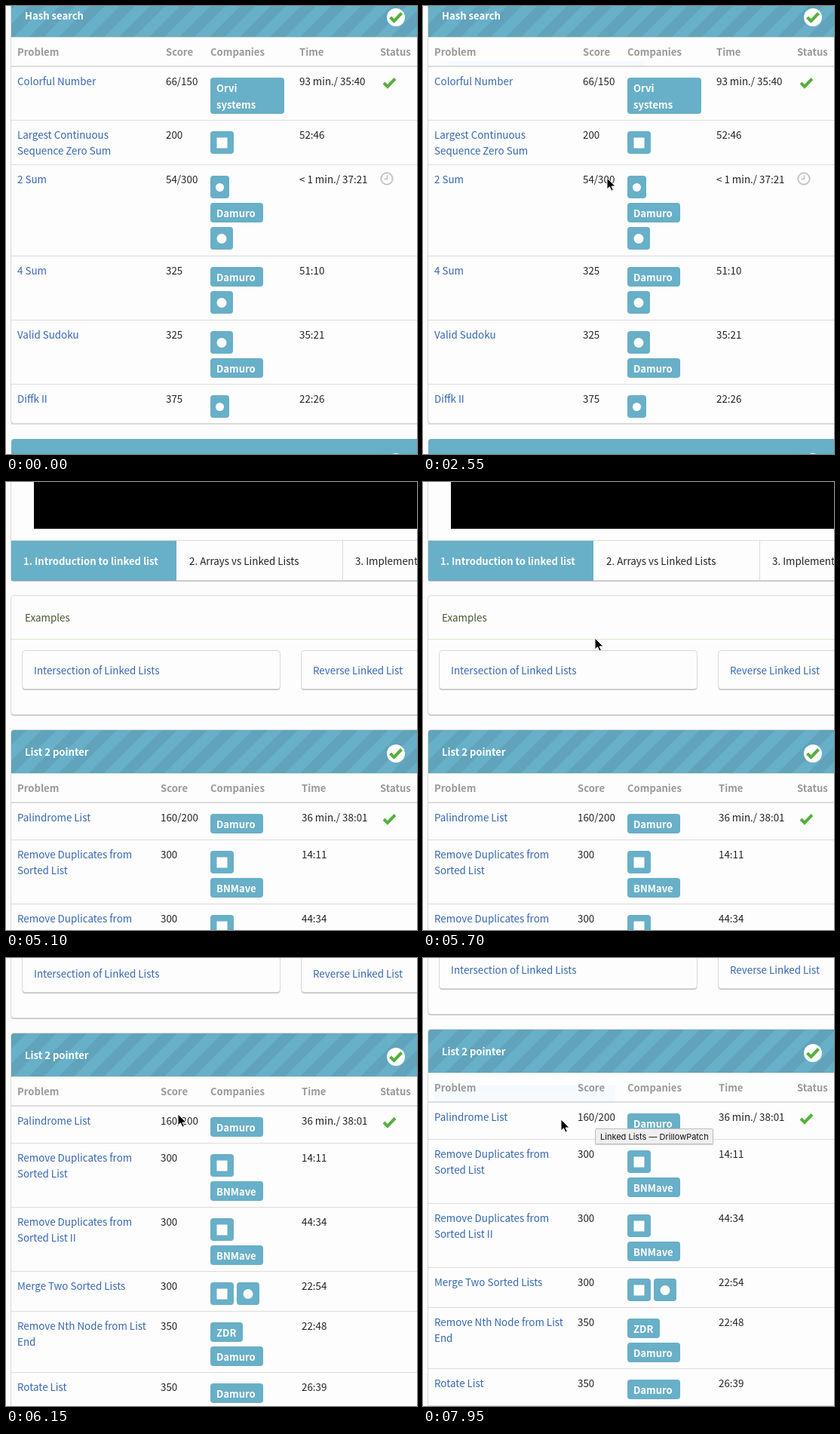
An HTML page for the animation above (8000 ms loop, 545x594 px).

```html
<!DOCTYPE html>
<html lang="en">
<head>
<meta charset="utf-8">
<title>Problem list</title>
<style>
  html, body { margin: 0; width: 100%; height: 100%; overflow: hidden; background: #fcfcfc; }
  svg { display: block; width: 545px; height: 594px; }
  text { font: 13.4px "Noto Sans CJK JP", "Noto Sans CJK SC", "Noto Sans CJK", "Open Sans", sans-serif; fill: #222; white-space: pre; }
  .bold { font-weight: 600; font-size: 13.1px; }
  .link { fill: #3567b0; }
  .head { fill: #999; }
  .white { fill: #fff; }
  .olive { fill: #46562f; }
  .tip { font: 11px Inter, "Liberation Sans", sans-serif; fill: #111; }
</style>
</head>
<body>
<svg id="stage" viewBox="0 0 545 594">
  <defs>
    <pattern id="stripes" width="40" height="40" patternUnits="userSpaceOnUse" patternTransform="translate(7 0)">
      <path d="M0 0H20L0 20ZM40 0V20L20 40H0Z" fill="#60a3bb"/>
    </pattern>
  </defs>
</svg>
<script>
const LOOP = 8000, STEP = 150;
const TEAL = '#68afc8', LINE = '#dcdcdc', TINT = '#f4faff', GREEN = '#55b03c';
const stage = document.getElementById('stage');

function add(parent, tag, attrs = {}, content) {
  const el = document.createElementNS('http://www.w3.org/2000/svg', tag);
  for (const key in attrs) el.setAttribute(key, attrs[key]);
  if (content) el.textContent = content;
  return parent.appendChild(el);
}
const group = parent => add(parent, 'g');
const box = (g, x, y, width, height, fill, rx = 0, more = {}) =>
  add(g, 'rect', { x, y, width, height, fill, rx, ...more });
const dot = (g, cx, cy, r, fill, more = {}) => add(g, 'circle', { cx, cy, r, fill, ...more });
const write = (g, x, y, content, style = '') => add(g, 'text', { x, y, class: style }, content);

function panel(g, x, y, w, h) {
  box(g, x - .5, y + 1, w + 1, h, '#c2c2c2', 4);
  box(g, x - .5, y - .5, w + 1, h, '#fdfdfd', 4, { stroke: '#d8d8d8' });
}

function check(g, x, y) {
  add(g, 'path', { d: `M${x - 7.5} ${y}l5 5 10-10.5`, fill: 'none', stroke: GREEN, 'stroke-width': 4 });
}

function titleBar(g, top, title, striped) {
  const shape = `M7 ${top + 57}V${top + 4}q0-4 4-4H545V${top + 57}Z`;
  add(g, 'path', { d: shape, fill: TEAL });
  if (striped) {
    const bar = group(g);
    bar.setAttribute('transform', `translate(0 ${top})`);
    add(bar, 'path', { d: 'M7 57V4q0-4 4-4H545V57Z', fill: 'url(#stripes)' });
  }
  write(g, 25, top + 34, title, 'bold white');
  dot(g, 517, top + 31, 12, '#fff');
  check(g, 517, top + 31);
}

// Company tags: text badges, or a badge with one plain white shape
const TAGS = {
  orvi: { w: 98, h: 48, lines: ['Orvi', 'systems'] },
  damuro: { w: 70, h: 26, lines: ['Damuro'] },
  bnmave: { w: 70, h: 26, lines: ['BNMave'] },
  zdr: { w: 43, h: 26, lines: ['ZDR'] },
  square: { w: 31, h: 30, size: 14 },
  small: { w: 25, h: 30, r: 5.5 },
  round: { w: 30, h: 30, r: 6.5 }
};

function badge(g, x, y, { w, h, lines, size, r }) {
  box(g, x, y, w, h, TEAL, 4);
  if (lines) lines.forEach((s, i) => write(g, x + 8, y + 19 + 22 * i, s, 'bold white'));
  else if (size) box(g, x + (w - size) / 2, y + (h - size) / 2 + .5, size, size, '#fff');
  else dot(g, x + w / 2, y + h / 2 + .5, r, '#fff');
}

function clock(g, x, y) {
  dot(g, x, y, 7.7, 'none', { stroke: '#c4c4c4', 'stroke-width': 1.9 });
  add(g, 'path', { d: `M${x + .5} ${y - 5}v5.5h-4`, fill: 'none', stroke: '#c4c4c4', 'stroke-width': 1.5 });
}

function table(g, top, title, scoreX, timeX, rows) {
  titleBar(g, top, title, true);
  box(g, 7, top + 57, 538, 1, '#d9e8d0');
  const heads = [[15, 'Problem'], [scoreX, 'Score'], [271, 'Companies'], [timeX, 'Time'], [496, 'Status']];
  for (const [x, s] of heads) write(g, x, top + 82, s, 'bold head');
  box(g, 7, top + 95, 538, 2, LINE);
  let y = top + 96;
  for (const [names, score, tags, time, status] of rows) {
    names.split('|').forEach((s, i) => write(g, 15, y + 25 + 21 * i, s, 'link'));
    write(g, scoreX, y + 25, score);
    write(g, timeX, y + 25, time);
    if (status) status(g, status === check ? 508.5 : 505, y + (status === check ? 22 : 19));
    let tagY = y + 15;
    for (const line of tags.split('|')) {
      let x = 271, height = 0;
      for (const name of line.split(' ')) {
        badge(g, x, tagY, TAGS[name]);
        x += TAGS[name].w + 4;
        height = TAGS[name].h;
      }
      tagY += height + 6;
    }
    y = Math.max(tagY + 2, y + 17 + 21 * names.split('|').length);
    box(g, 7, y, 538, 1, LINE);
  }
}

// First page
const hashPage = group(stage);
panel(hashPage, 7, -16, 560, 570);
const headTint = box(hashPage, 34, 73, 259, 6, TINT);
const exitTint = box(hashPage, 232, 41, 123, 37, TINT);
table(hashPage, -16, 'Hash search', 212, 389, [
  ['Colorful Number', '66/150', 'orvi', '93 min./ 35:40', check],
  ['Largest Continuous|Sequence Zero Sum', '200', 'square', '52:46'],
  ['2 Sum', '54/300', 'small|damuro|round', '< 1 min./ 37:21', clock],
  ['4 Sum', '325', 'damuro|round', '51:10'],
  ['Valid Sudoku', '325', 'round|damuro', '35:21'],
  ['Diffk II', '375', 'small', '22:26']
]);
titleBar(hashPage, 574, '', false);

// Second page, laid out around the top of its table
const listPage = group(stage);
box(listPage, 0, 0, 545, 594, '#fcfcfc');
const scroller = group(listPage);
panel(scroller, 7, -500, 560, 302);
box(scroller, 37, -500, 508, 233, '#000');
box(scroller, 7, -252, 538, 1, LINE);
box(scroller, 7, -251, 219, 53, TEAL);
box(scroller, 446, -251, 1, 53, LINE);
write(scroller, 23, -219, '1. Introduction to linked list', 'bold white');
write(scroller, 243, -219, '2. Arrays vs Linked Lists');
write(scroller, 463, -219, '3. Implementation');
panel(scroller, 7, -178, 560, 158);
write(scroller, 25, -144, 'Examples', 'olive');
box(scroller, 7, -121, 538, 1, '#d9e8cc');
panel(scroller, 22, -105, 341, 51);
panel(scroller, 392, -105, 341, 51);
write(scroller, 37, -74, 'Intersection of Linked Lists', 'link');
write(scroller, 407, -74, 'Reverse Linked List', 'link');
panel(scroller, 7, 0, 560, 900);
const listTint = box(scroller, 15, 74, 240, 21, TINT);
table(scroller, 0, 'List 2 pointer', 205, 392, [
  ['Palindrome List', '160/200', 'damuro', '36 min./ 38:01', check],
  ['Remove Duplicates from|Sorted List', '300', 'square|bnmave', '14:11'],
  ['Remove Duplicates from|Sorted List II', '300', 'square|bnmave', '44:34'],
  ['Merge Two Sorted Lists', '300', 'square round', '22:54'],
  ['Remove Nth Node from List|End', '350', 'zdr|damuro', '22:48'],
  ['Rotate List', '350', 'damuro', '26:39']
]);

const tooltip = group(stage);
box(tooltip, 228, 228, 157, 20, '#000', 1, { opacity: .15 });
box(tooltip, 228.5, 226.5, 156, 20, '#efefef', 1, { stroke: '#bdbdbd' });
write(tooltip, 235, 240.5, 'Linked Lists — DrillowPatch', 'tip');

const cursor = add(stage, 'path', {
  d: 'M0 0V15L3.5 11.8 6 17.2 8.4 16.1 6 11H11Z',
  fill: '#000', stroke: '#fff', 'stroke-width': 1
});

// Each step is [time, value], held until the next one
function play(el, prop, steps) {
  const frames = steps.map(([time, value]) => ({ offset: time / LOOP, [prop]: value, easing: 'step-end' }));
  frames.push({ offset: 1, [prop]: steps[steps.length - 1][1] });
  el.animate(frames, { duration: LOOP, iterations: Infinity });
}
const showFrom = (el, time) => play(el, 'opacity', [[0, 0], [time, 1]]);
const move = (x, y) => `translate(${x}px, ${y}px)`;
const away = move(-60, 0);
const path = (start, points) => points.map(([x, y], i) => [start + i * STEP, move(x, y)]);

showFrom(listPage, 5100);
showFrom(headTint, 900);
showFrom(exitTint, 4050);
showFrom(listTint, 7050);
showFrom(tooltip, 6600);
play(scroller, 'transform', [[0, 329], [6000, 176], [6150, 100], [6300, 95]].map(([t, y]) => [t, move(0, y)]));
play(cursor, 'transform', [
  [0, away],
  ...path(450, [[36, 196], [82, 152], [142, 112], [200, 86], [248, 74], [270, 74], [280, 77]]),
  ...path(1500, [[276, 98], [258, 122], [236, 142], [216, 158], [213, 172], [226, 186], [241, 197]]),
  ...path(2550, [[244, 228], [252, 246], [244, 260], [226, 256], [211, 242], [226, 229], [252, 225], [233, 233]]),
  ...path(3900, [[268, 146], [340, 20]]),
  [4200, away],
  ...path(5550, [[234, 185], [228, 207]]),
  ...path(6750, [[170, 190], [84, 172], [16, 186], [92, 214], [186, 234], [244, 222]]),
  ...path(7650, [[236, 200], [206, 192], [183, 214]])
]);
</script>
</body>
</html>
```
